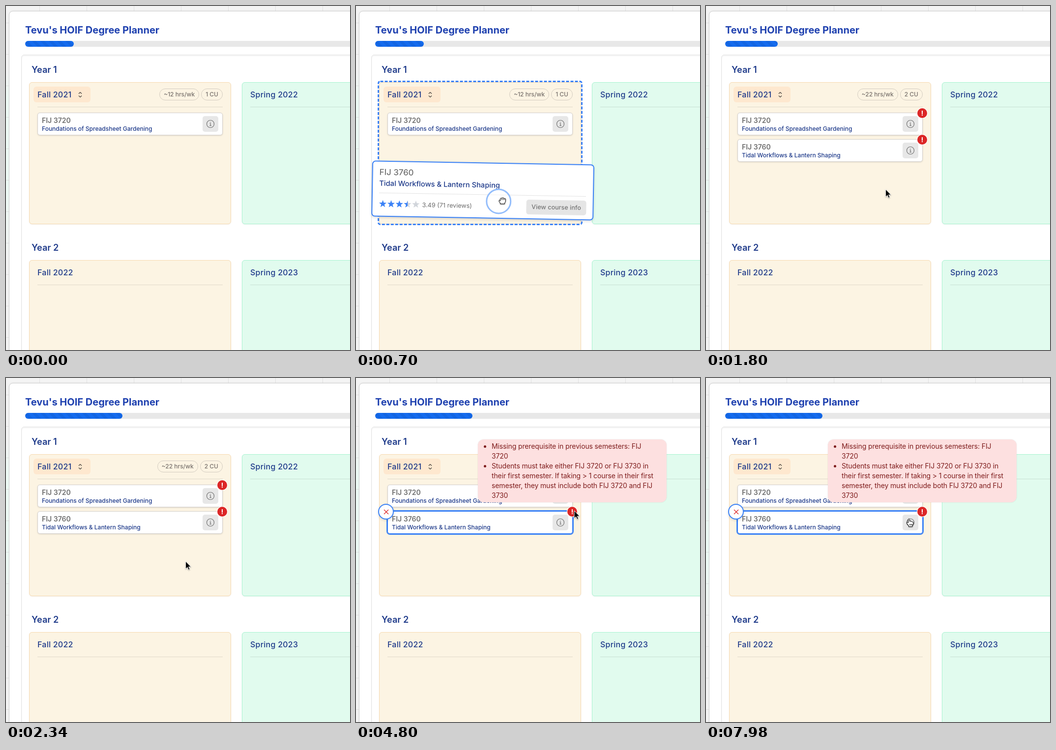
An HTML page that plays this animation: 700x700 px, repeating every 8 s.

```html
<!DOCTYPE html>
<html lang="en">
<head>
<meta charset="utf-8">
<title>Degree planner</title>
<style>
  html, body { margin: 0; width: 100%; height: 100%; overflow: hidden; }
  * { box-sizing: border-box; }
  #stage { position: relative; width: 700px; height: 700px; overflow: hidden; background: #f4f4f4;
    font: 500 16px/20px Inter, sans-serif; color: #1e3a8a; }
  #stage div, #stage svg { position: absolute; white-space: nowrap; }
  svg { overflow: visible; }
  .grid { inset: 0; background:
    repeating-linear-gradient(90deg, transparent 0 68px, #e2e2e2 68px 69px, transparent 69px 96px),
    repeating-linear-gradient(transparent 0 34px, #e2e2e2 34px 35px, transparent 35px 64px),
    linear-gradient(transparent 130px, #eefaf5 190px 380px, transparent 520px); }
  .page { left: 6px; top: 10px; width: 800px; height: 800px; background: #fff;
    border: 1px solid #cfcfcf; border-radius: 8px; box-shadow: 0 0 4px #0001; }
  .years { left: 31px; top: 99px; width: 800px; height: 800px; border: 1px solid #e2e2e2;
    border-radius: 6px; box-shadow: inset 0 2px 3px #0000000d; }
  .title { left: 39px; top: 39px; font-size: 20px; font-weight: 700; color: #1e40af; }
  .track { left: 39px; top: 71px; width: 800px; height: 12px; border-radius: 6px; background: #e8e8e8; }
  #bar { height: 12px; border-radius: 6px;
    background: repeating-linear-gradient(45deg, #146bee 0 6px, #1265e2 6px 12px); }
  .year { left: 52px; font-size: 18px; font-weight: 600; }
  .term { width: 411px; height: 289px; border: 1px solid; border-radius: 6px; box-shadow: 0 1px 2px #0000000d; }
  .fall { left: 47px; background: #fcf4e3; border-color: #f6d9b0; }
  .spring { left: 480px; background: #e1fbee; border-color: #a7f3d0; }
  .name { letter-spacing: .25px; }
  .term > .name { left: 16px; top: 14px; }
  .term > .rule { left: 16px; right: 16px; top: 49px; height: 1px; background: #0000001c; }
  .select { left: 56px; top: 164px; width: 116px; height: 32px; border-radius: 6px; background: #fee8cf; }
  .select .name { left: 8px; top: 6px; }
  #stage .pills { right: 259px; top: 168px; display: flex; gap: 4px; }
  #stage .pills div { position: static; height: 24px; padding: 0 8px; border: 1px solid #d3ccc0;
    border-radius: 12px; font-size: 12px; line-height: 22px; color: #78716c; }
  .course { left: 64px; width: 377px; height: 46px; background: #fff; border: 1px solid #d6d3d1;
    border-radius: 5px; box-shadow: 0 1px 3px #0002; }
  .course.hover { border-color: #3b82f6; outline: 2px solid #3b82f6; }
  .code { left: 8px; top: 5px; font-size: 14px; font-weight: 600; color: #6f6f6f; }
  .label { left: 8px; top: 22px; font-size: 12px; }
  .info { left: 335px; top: 6px; width: 32px; height: 32px; border-radius: 5px; background: #e7e7e7; }
  .badge { left: 430px; width: 20px; height: 20px; border-radius: 50%; background: #dc2626;
    box-shadow: 0 0 0 1px #fff; }
  .badge::before, .badge::after { content: ""; position: absolute; left: 9px; top: 5px; width: 2px;
    height: 7px; background: #fff; }
  .badge::after { top: 13px; height: 2px; }
  #remove { left: 45px; top: 256px; width: 32px; height: 32px; border-radius: 50%; background: #fff;
    border: 2px solid #3b82f6; box-shadow: 0 2px 5px #0002; }
  #tip { left: 248px; top: 125px; width: 384px; height: 128px; padding: 4px 0 0 28px; border-radius: 12px;
    background: #fde0e0; box-shadow: 0 0 2px #0002; font-size: 14px; font-weight: 400;
    letter-spacing: -.13px; color: #7f1d1d; }
  #tip i { position: absolute; left: 12px; width: 5px; height: 5px; border-radius: 50%; background: #7f1d1d; }
  #drag { left: 0; top: 0; width: 452px; height: 114px; background: #fff; border: 2px solid #3b82f6;
    border-radius: 7px; box-shadow: 0 2px 5px #0002; }
  #drag .code { left: 13px; top: 11px; font-size: 16.8px; font-weight: 500; }
  #drag .label { left: 13px; top: 34px; font-size: 14.7px; }
  #drag .rule { left: 13px; width: 421px; top: 63px; height: 1px; background: #e2e2e2; }
  #drag .rating { left: 101px; top: 77px; font-size: 12.6px; font-weight: 400; color: #6b6b6b; }
  #drag .button { left: 313px; top: 72px; width: 122px; height: 30px; border-radius: 5px; background: #e5e5e5;
    font-size: 12.6px; line-height: 30px; text-align: center; color: #757575; }
  #ring { left: -26px; top: -26px; width: 52px; height: 52px; border: 3px solid #93bdfb; border-radius: 50%;
    background: #ffffff80; }
  #cursor { left: 0; top: 0; filter: drop-shadow(0 1px 1px #0005); }
</style>
</head>
<body>
<div id="stage">
  <div class="grid"></div>
  <div class="page"></div>
  <div class="title">Tevu's HOIF Degree Planner</div>
  <div class="track"><div id="bar"></div></div>
  <div class="years"></div>
  <div class="year" style="top:120px">Year 1</div>
  <div class="year" style="top:482px">Year 2</div>
  <div id="terms"></div>
  <svg style="left:0;top:0" width="1" height="1">
    <rect id="target" x="45.5" y="153.5" width="414" height="291" rx="4" fill="none" stroke="#3b82f6"
      stroke-width="3" stroke-dasharray="6 3"/>
  </svg>
  <div class="select"><div class="name">Fall 2021</div>
    <svg style="left:91px;top:11px" width="8" height="11" fill="none" stroke="#44403c" stroke-width="1.2">
      <path d="M1 3.5L4 .5L7 3.5M1 7.5L4 10.5L7 7.5"/></svg>
  </div>
  <div class="pills"><div id="hours"></div><div id="units"></div></div>
  <div id="courses"></div>
  <div id="alerts"><div class="badge" style="top:208px"></div><div class="badge" style="top:262px"></div></div>
  <div id="remove"><svg style="left:9.5px;top:9.5px" width="9" height="9" stroke="#dc2626" stroke-width="1.3">
    <path d="M0 0L9 9M9 0L0 9"/></svg></div>
  <div id="tip"><i style="top:12px"></i><i style="top:52px"></i>
    Missing prerequisite in previous semesters: FIJ<br>3720<br>
    Students must take either FIJ 3720 or FIJ 3730 in<br>their first semester. If taking &gt; 1 course in their first<br>semester, they must include both FIJ 3720 and FIJ<br>3730</div>
  <div id="drag">
    <div class="code">FIJ 3760</div>
    <div class="label">Tidal Workflows &amp; Lantern Shaping</div>
    <div class="rule"></div>
    <svg id="stars" style="left:21px;top:86px" width="1" height="1">
      <linearGradient id="half"><stop offset=".5" stop-color="#3b82f6"/><stop offset=".5" stop-color="#d1d5db"/></linearGradient>
    </svg>
    <div class="rating">3.49 (71 reviews)</div>
    <div class="button">View course info</div>
  </div>
  <div id="ring"></div>
  <svg id="cursor" width="1" height="1" fill="#fff" stroke="#000" stroke-linejoin="round">
    <path id="grab" d="M-4 6.500L-4 4.500Q-7 2-6.500-.5Q-6-2-4-1L-4-4Q-3.500-6-1.500-5Q-.5-7 1.500-5.500Q3.500-6.500 4.500-4.500Q7-5 7-2.500L6.500 2L5 4.500L5 6.500ZM-4-1V1M-1.200-4.500V-1.500M1.700-5V-1.500M4.500-4.500V-1.500"/>
    <path id="arrow" fill="#000" stroke="#fff" d="M0 0V15.500L3.600 12.200L6 17.500L8.600 16.400L6.200 11.200H11Z"/>
    <path id="point" d="M-2.500 8.500V6.500L-6.500 1.500Q-7.500-1-5-.5L-3.500 1V-6.500Q-2.200-8.800-.8-6.500V-2.500Q1-4 2.200-2Q4-3 4.800-1Q7-1.500 7 1L6.500 4.500L5 6.500V8.500ZM-.2 3V6M2.200 3V6M4.400 3V6"/>
  </svg>
</div>
<script>
const LOOP = 8000, DRAG_IN = 250, RELEASE = 1500, SETTLE = 1750, HOVER = 4180, TIP = 4350;
const $ = id => document.getElementById(id);
const clamp = v => Math.max(0, Math.min(1, v));
const ease = u => u * u * (3 - 2 * u);
const span = (t, from, to) => ease(clamp((t - from) / (to - from)));
const mix = (a, b, k) => a + (b - a) * k;
const show = (id, on) => $(id).style.visibility = on ? 'visible' : 'hidden';

const term = (kind, top, name) =>
  `<div class="term ${kind}" style="top:${top}px"><div class="name">${name}</div><div class="rule"></div></div>`;
$('terms').innerHTML = term('fall', 155, '') + term('spring', 155, 'Spring 2022') +
  term('fall', 517, 'Fall 2022') + term('spring', 517, 'Spring 2023');

const course = (id, top, code, label) =>
  `<div class="course" id="${id}" style="top:${top}px"><div class="code">${code}</div><div class="label">${label}</div>
   <div class="info"><svg style="left:8px;top:8px" width="16" height="16" fill="none" stroke="#737373" stroke-width="1.2">
   <circle cx="8" cy="8" r="7.5"/><path d="M6.500 7H8.200V11.500M6.200 11.500H10M8 4V5.300"/></svg></div></div>`;
$('courses').innerHTML = course('first', 217, 'FIJ 3720', 'Foundations of Spreadsheet Gardening') +
  course('added', 271, 'FIJ 3760', 'Tidal Workflows &amp; Lantern Shaping');

const starPoints = Array.from({ length: 10 }, (_, i) => {
  const r = i % 2 ? 3.3 : 8, a = i * Math.PI / 5;
  return [r * Math.sin(a), -r * Math.cos(a)].map(v => v.toFixed(2));
}).join(' ');
['#3b82f6', '#3b82f6', '#3b82f6', 'url(#half)', '#d1d5db'].forEach((fill, i) =>
  $('stars').insertAdjacentHTML('beforeend',
    `<polygon points="${starPoints}" fill="${fill}" transform="translate(${i * 16.8})"/>`));

// The ring and the card trail slightly behind the hand.
function dragPoint(t) {
  const left = (1 - clamp(t / 900)) ** 1.5;
  return [366 - 658 * left, 376 + 195 * left];
}

function pointer(t) {
  const a = span(t, 3200, 4000), b = span(t, 4080, 4300), c = span(t, 6900, 7500);
  const x = mix(365.5, 452, 1 - (1 - a) ** 2.5), y = mix(373, 272, a);
  return [mix(mix(x, 444, b), 415, c), mix(mix(y, 270, b), 294, c)];
}

function draw(t) {
  const held = t < RELEASE, added = t >= SETTLE, hover = t >= HOVER;
  const [x, y] = held ? dragPoint(t) : pointer(t);
  const pointing = x < 432 && t > 6900;

  show('target', held && t >= DRAG_IN);
  $('bar').style.width = mix(99, 198, span(t, SETTLE, SETTLE + 300)) + 'px';
  $('hours').textContent = added ? '~22 hrs/wk' : '~12 hrs/wk';
  $('units').textContent = added ? '2 CU' : '1 CU';

  const [cardX, cardY] = dragPoint(t - 38), drop = span(t, RELEASE, SETTLE);
  show('drag', !added);
  $('drag').style.transform = `translate(${mix(cardX - 245, 64, drop)}px, ${mix(cardY - 84, 271, drop)}px) rotate(${1 - drop}deg)`;

  const [ringX, ringY] = dragPoint(t - 14), fade = span(t, RELEASE, RELEASE + 150);
  $('ring').style.transform = `translate(${ringX}px, ${ringY - 1}px)`;
  $('ring').style.opacity = 1 - fade;

  show('added', added);
  show('alerts', added);
  $('added').classList.toggle('hover', hover);
  show('remove', hover);
  $('tip').style.opacity = span(t, TIP, TIP + 150);

  $('cursor').style.transform = `translate(${x}px, ${y}px)`;
  show('grab', held);
  show('arrow', !held && !pointing);
  show('point', pointing);
}

const start = performance.now();
function frame() {
  draw((performance.now() - start) % LOOP);
  requestAnimationFrame(frame);
}
frame();
</script>
</body>
</html>
```
